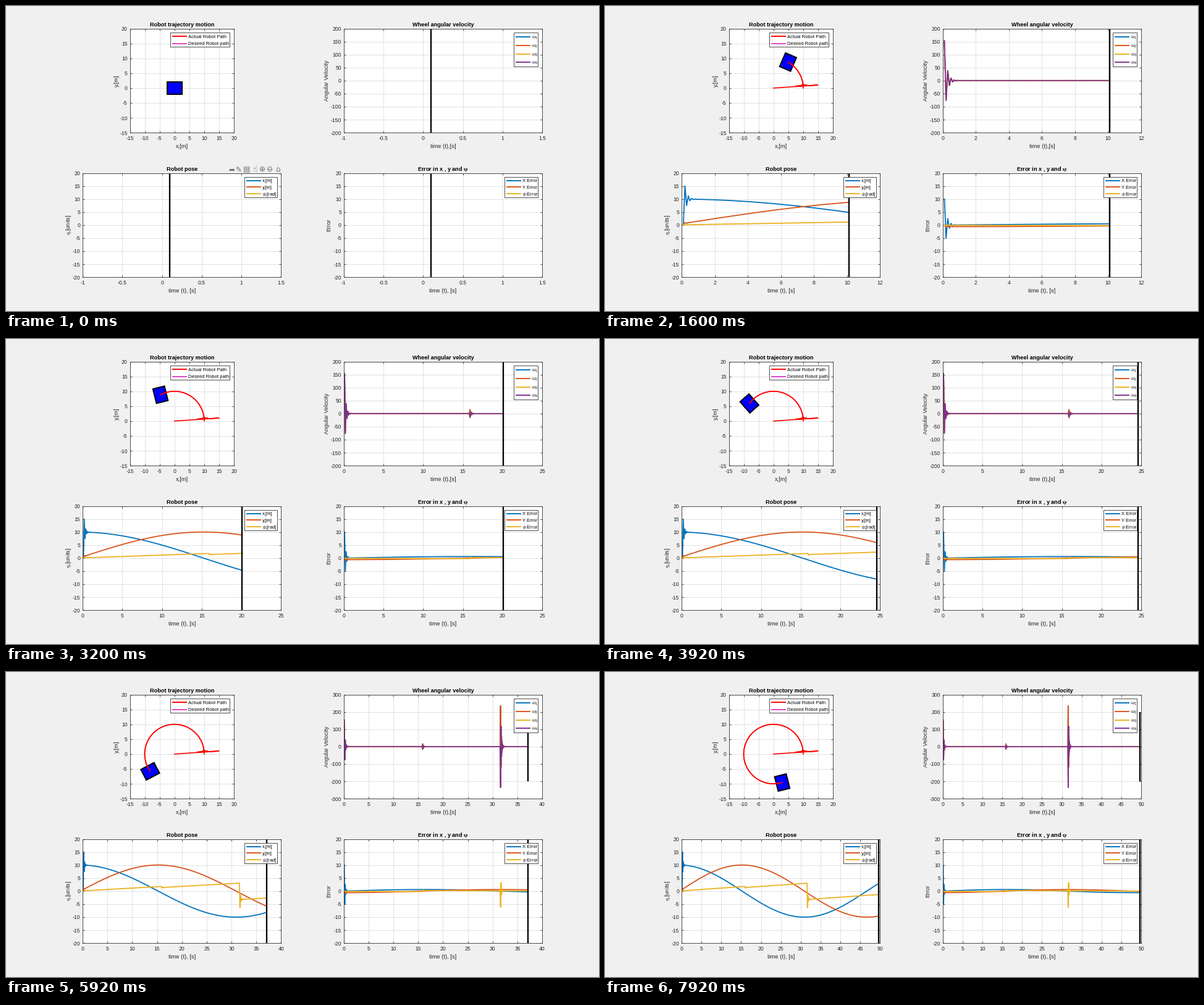
A matplotlib script that plays this animation: 960x494 px, repeating every 8000 ms.

```python
import math

import matplotlib.pyplot as plt
import numpy as np
from matplotlib.animation import FuncAnimation
from matplotlib.patches import Polygon, Rectangle

W, H, DPI = 960, 494, 100
PX = 72 / DPI
FRAMES, INTERVAL = 100, 80
BLUE, ORANGE, YELLOW, PURPLE = "#0072bd", "#d95319", "#edb120", "#7e2f8e"
COLORS = [BLUE, ORANGE, YELLOW, PURPLE]
INK, GRID, ICON = "#262626", "#dfdfdf", "#6e6e6e"

plt.rcParams.update({
    "font.family": "Liberation Sans",
    "axes.unicode_minus": False,
    "mathtext.fontset": "custom",
    "mathtext.rm": "Liberation Sans",
    "mathtext.it": "Liberation Serif:italic",
    "mathtext.bf": "Liberation Serif:bold",
})


def simulate(steps=500, dt=0.1, gain=15, arm=2.5):
    """Track a circle with proportional control plus feed-forward."""
    pose = np.zeros(3)
    poses, errors, wheels = [], [], []
    for k in range(steps):
        a = 0.1 * k * dt
        c, s = math.cos(a), math.sin(a)
        error = np.array([10 * c, 10 * s, math.atan2(s, c)]) - pose
        rate = np.array([-10 * s, 10 * c, math.atan2(c, -s)]) + gain * error
        forward = math.cos(pose[2]) * rate[0] + math.sin(pose[2]) * rate[1]
        turn = arm * rate[2]
        poses.append(pose)
        errors.append(error)
        wheels.append([forward - turn, forward - turn, forward + turn, forward + turn])
        pose = pose + dt * rate
    return np.array(poses), np.array(errors), np.array(wheels)


POSE, ERROR, WHEEL = simulate()
TIME = 0.1 * np.arange(1, len(POSE) + 1)

fig = plt.figure(figsize=(W / DPI, H / DPI), dpi=DPI, facecolor="#f0f0f0")

# Overlay in stage pixels for labels, legends and the toolbar.
over = fig.add_axes([0, 0, 1, 1], facecolor="none", zorder=10)
over.set(xlim=(0, W), ylim=(H, 0))
over.axis("off")


def label(x, y, text, size=9.3, ha="center", color=INK, **kw):
    """Text whose capitals are centred on y."""
    return over.text(x, y + 0.36 * size, text, fontsize=size * PX, ha=ha, color=color, **kw)


class Panel:
    """One cell of the two-by-two layout, with its captions and legend."""

    width, height = 321.3, 168.5

    def __init__(self, col, row, title, xlabel, ylabel, ylabel_x, square=False):
        self.left = 124.1 + 422.7 * col
        self.top = 36.6 + 234 * row
        self.bottom = self.top + self.height
        middle = self.left + self.width / 2
        width = self.height if square else self.width
        left = middle - width / 2
        self.ax = ax = fig.add_axes([left / W, 1 - self.bottom / H,
                                     width / W, self.height / H])
        ax.set_axisbelow(True)
        ax.grid(color=GRID, lw=0.9 * PX)
        ax.tick_params(direction="in", top=True, right=True, length=3 * PX,
                       width=0.8 * PX, color=INK, labelcolor=INK, labelsize=8.7 * PX)
        ax.tick_params(axis="x", pad=4.8 * PX)
        ax.tick_params(axis="y", pad=3.8 * PX)
        for spine in ax.spines.values():
            spine.set(color=INK, linewidth=0.8 * PX)
        label(middle, self.top - 6.9, title, 9.2, color="black", weight="bold")
        label(middle, self.bottom + 21.2, xlabel)
        over.text(ylabel_x, self.top + self.height / 2, ylabel, fontsize=9.3 * PX,
                  color=INK, rotation=90, ha="center", va="center")
        self.right = left + width

    def yrange(self, low, high, step):
        self.ax.set_ylim(low, high)
        self.ax.set_yticks(range(low, high + 1, step))

    def legend(self, width, pitch, names, colors):
        right, top = self.right - 6.9, self.top + 6.5
        left = right - width
        over.add_patch(Rectangle((left, top), width, pitch * len(names),
                                 fc="white", ec=INK, lw=0.8 * PX))
        for i, (name, color) in enumerate(zip(names, colors)):
            y = top + pitch * (i + 0.5)
            over.plot([left + 3, left + 27.5], [y, y], color=color, lw=1.9 * PX,
                      solid_capstyle="butt")
            label(left + 29.5, y, name, 7.6, ha="left", color="black")


path = Panel(0, 0, "Robot trajectory motion", "x,[m]", "y,[m]", 179, square=True)
wheel = Panel(1, 0, "Wheel angular velocity", "time (t),[s]", "Angular Velocity", 519)
pose = Panel(0, 1, "Robot pose", "time (t), [s]", r"$\eta$,[units]", 102)
error = Panel(1, 1, r"Error in x , y and $\mathbf{\psi}$", "time (t), [s]", "Error", 523)

path.yrange(-15, 20, 5)
path.ax.set_xlim(-15, 20)
path.ax.set_xticks(range(-15, 21, 5))
pose.yrange(-20, 20, 5)
error.yrange(-20, 20, 5)

path.legend(96.5, 11.7, ("Actual Robot Path", "Desired Robot path"), ("red", "#e040c8"))
wheel.legend(39.5, 13.8, [rf"$\omega_{i}$" for i in range(1, 5)], COLORS)
pose.legend(53, 10.9, ("x,[m]", "y,[m]", r"$\psi$,[rad]"), COLORS)
error.legend(54.5, 10.9, ("X Error", "Y Error", r"$\psi$ Error"), COLORS)

toolbar = [label(365 + 12.45 * i, 264, glyph, 12, color=ICON, family="DejaVu Sans")
           for i, glyph in enumerate("➦✎▤☝⊕⊖⌂")]

BODY = np.array([(-2.5, -2), (2.5, -2), (2.5, 2), (-2.5, 2)])
robot = path.ax.add_patch(Polygon(BODY, fc="blue", ec="black", lw=2 * PX, zorder=2))
wanted, actual = (path.ax.plot([], [], color="red", lw=1.6 * PX, zorder=3)[0]
                  for _ in range(2))

charts = []
for panel, data, reach in ((wheel, WHEEL, 200), (pose, POSE, 20), (error, ERROR, 20)):
    lines = [panel.ax.plot([], [], color=c, lw=1.8 * PX)[0] for c, _ in zip(COLORS, data[0])]
    cursor, = panel.ax.plot([], [], color="black", lw=2.3 * PX, solid_capstyle="butt")
    charts.append((panel.ax, data, reach, lines, cursor))


def time_scale(end):
    """Limits and tick step of an automatic time axis."""
    if end < 0.15:
        return -1, 1.5, 0.5
    if end < 1.15:
        return 0.1, end, (end - 0.1) / 10
    step = next(s for s in (0.2, 0.5, 1, 2, 5) if math.ceil(end / s - 1e-9) <= 10)
    return 0, step * math.ceil(end / step - 1e-9), step


def update(i):
    n = 5 * i + 1
    now = TIME[n - 1]
    x, y, psi = POSE[n - 1]
    c, s = math.cos(psi), math.sin(psi)
    robot.set_xy(BODY @ np.array([(c, s), (-s, c)]) + (x, y))
    actual.set_data(*POSE[:n, :2].T)
    wanted.set_data(*(POSE + ERROR)[:n, :2].T)

    low, high, step = time_scale(now)
    ticks = np.arange(low, high + step / 2, step)
    names = [f"{round(t, 3) + 0:g}" for t in ticks]
    for ax, data, reach, lines, cursor in charts:
        ax.set_xlim(low, high)
        ax.set_xticks(ticks, names)
        for line, values in zip(lines, data.T):
            line.set_data(TIME[:n], values[:n])
        cursor.set_data([now, now], [-reach, reach])

    if np.abs(WHEEL[:n]).max() > 200:
        wheel.yrange(-300, 300, 100)
    else:
        wheel.yrange(-200, 200, 50)
    for icon in toolbar:
        icon.set_visible(i == 0)
    return []


anim = FuncAnimation(fig, update, frames=FRAMES, interval=INTERVAL, repeat=True,
                     repeat_delay=0, init_func=lambda: update(0))
plt.show()
```
